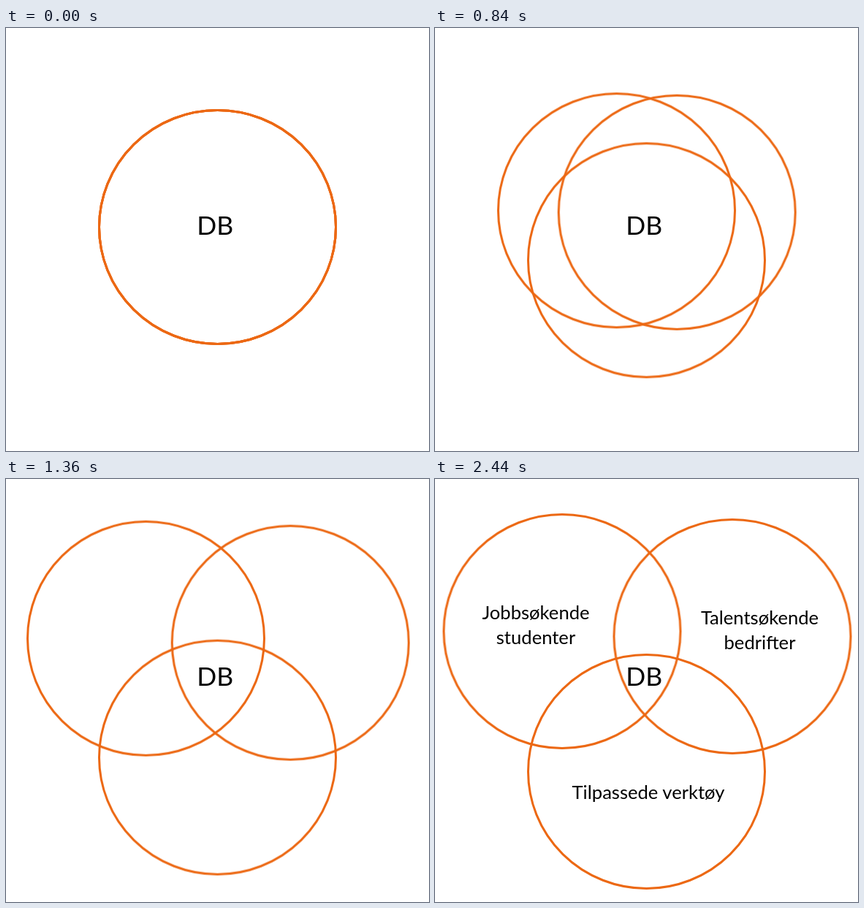
Write an HTML page that moves like this. It is 579 px wide and 579 px high and loops after 2.99 s.

```html
<!DOCTYPE html>
<html lang="no">
<head>
<meta charset="utf-8">
<title>DB</title>
<style>
  html, body { margin: 0; width: 100%; height: 100%; overflow: hidden; background: #fff; }
  svg { display: block; width: 100vw; height: 100vh; }
  ellipse {
    fill: none; stroke: #ec6813; stroke-width: 3;
    animation: spread 2990ms infinite;
  }
  .left   { --dx: -115.5px; --dy: -64px; }
  .right  { --dx: 117.5px;  --dy: -57px; }
  .bottom { --dx: 0px;      --dy: 128px; }
  text { font-family: Lato, Carlito, sans-serif; text-anchor: middle; fill: #000; }
  .core { font-size: 35.5px; }
  .labels { font-size: 25.6px; opacity: 0; animation: appear 2990ms linear infinite; }

  /* Quadratic ease in, then ease out, from 120 to 1832 ms */
  @keyframes spread {
    0% { transform: translate(0, 0); }
    4.013% {
      transform: translate(0, 0);
      animation-timing-function: cubic-bezier(.3333, 0, .6667, .3333);
    }
    32.642% {
      transform: translate(calc(var(--dx) / 2), calc(var(--dy) / 2));
      animation-timing-function: cubic-bezier(.3333, .6667, .6667, 1);
    }
    61.271%, 100% { transform: translate(var(--dx), var(--dy)); }
  }
  @keyframes appear {
    0%, 61.87% { opacity: 0; }
    81.6%, 100% { opacity: 1; }
  }
</style>
</head>
<body>
<svg viewBox="0 0 579 579">
  <ellipse class="left" cx="289.5" cy="272.5" rx="162" ry="160"/>
  <ellipse class="right" cx="289.5" cy="272.5" rx="162" ry="160"/>
  <ellipse class="bottom" cx="289.5" cy="272.5" rx="162" ry="160"/>
  <text class="core" x="286.3" y="283">DB</text>
  <g class="labels">
    <text x="138" y="192">Jobbsøkende</text>
    <text x="138" y="226">studenter</text>
    <text x="444.5" y="199">Talentsøkende</text>
    <text x="444.5" y="233">bedrifter</text>
    <text x="292" y="438">Tilpassede verktøy</text>
  </g>
</svg>
</body>
</html>
```
